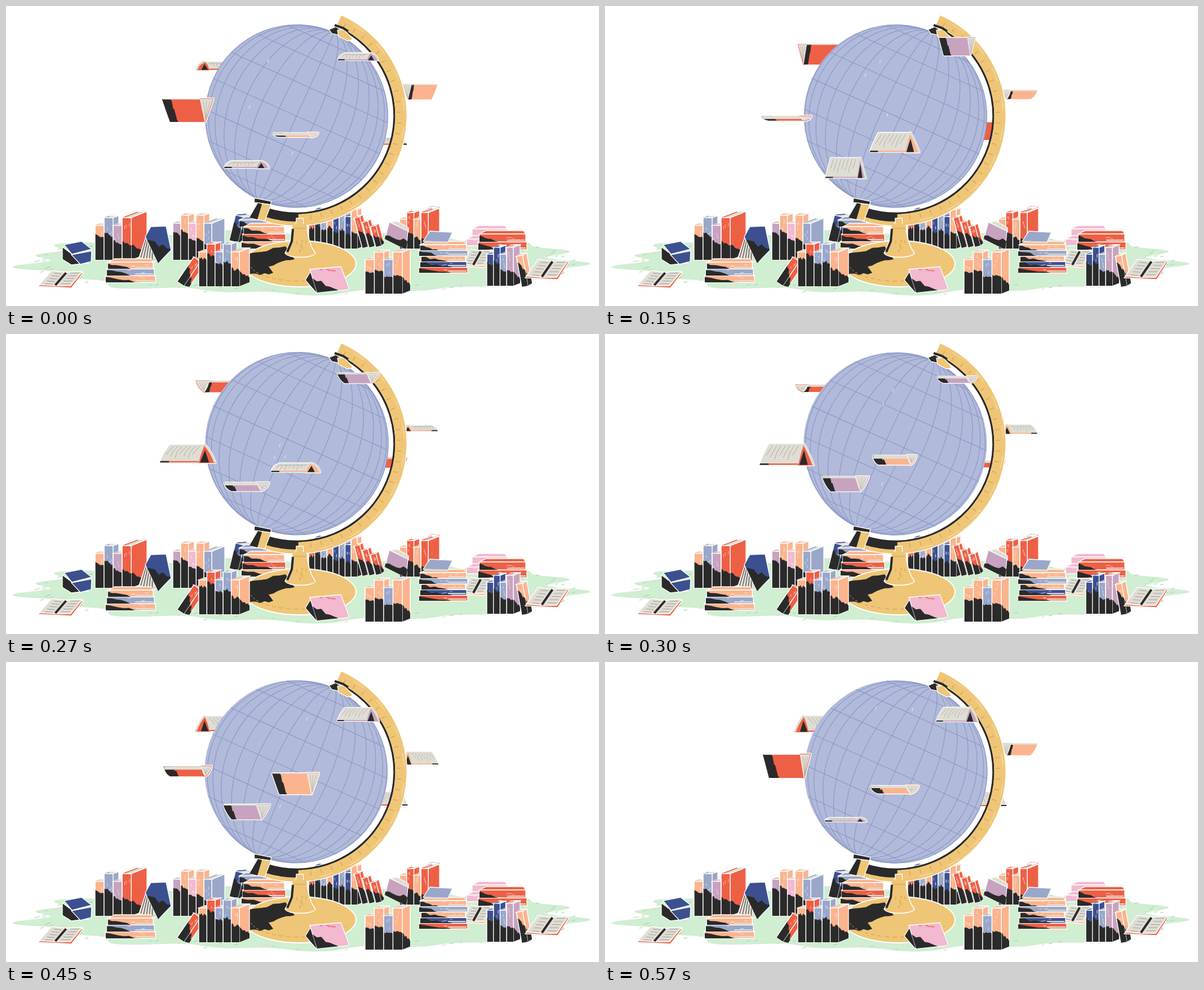
An HTML page with a canvas for the animation above (0.6 s loop, 1052x533 px).

```html
<!DOCTYPE html>
<html lang="en">
<head>
<meta charset="utf-8">
<title>Globe and flying books</title>
<style>
html, body { margin: 0; width: 100%; height: 100%; overflow: hidden; background: #fff; }
canvas { display: block; }
</style>
</head>
<body>
<canvas id="stage" width="1052" height="533"></canvas>
<script>
const ctx = document.getElementById('stage').getContext('2d');
const ink = '#2b2a2a', pages = '#dfddd4', peach = '#fbb48d', red = '#ee6045', lilac = '#c7a3bf',
  navy = '#3c508f', slate = '#9aa7c9', pink = '#f2b9d0', gold = '#efc677', ochre = '#d2a049',
  green = '#d0eed1', mint = '#a5cfb2', blush = '#f6c4cf', blue = '#b1bada', gridBlue = '#8e99c6';
const CX = 515.5, CY = 195, R = 162.5, STEP = 30, STEPS = 20, LOOP = STEP * STEPS;
const rad = deg => deg * Math.PI / 180;
const mix = (a, b, k) => a + (b - a) * k;

let seed = 1;
const rnd = () => (seed = seed * 16807 % 2147483647) / 2147483647;

function poly(color, p, edge = '#fff') {
  ctx.beginPath();
  for (let i = 0; i < p.length; i += 2) ctx.lineTo(p[i], p[i + 1]);
  ctx.closePath();
  ctx.fillStyle = color;
  ctx.fill();
  if (edge) { ctx.strokeStyle = edge; ctx.lineWidth = 1.3; ctx.stroke(); }
}

function line(color, width, ...p) {
  ctx.beginPath();
  for (let i = 0; i < p.length; i += 2) ctx.lineTo(p[i], p[i + 1]);
  ctx.strokeStyle = color;
  ctx.lineWidth = width;
  ctx.stroke();
}

function arc(r, from, to, color, width) {
  ctx.beginPath();
  ctx.arc(CX, CY, r, rad(from), rad(to));
  ctx.strokeStyle = color;
  ctx.lineWidth = width;
  ctx.stroke();
}

function ellipse(x, y, rx, ry, color) {
  ctx.beginPath();
  ctx.ellipse(x, y, rx, ry, 0, 0, 7);
  ctx.fillStyle = color;
  ctx.fill();
}

// Points of a rough brushed line, used as the border of shadows.
function ragged(x0, y0, x1, y1, amp = 3, n = 6) {
  const p = [];
  for (let i = 0; i <= n; i++)
    p.push(mix(x0, x1, i / n), mix(y0, y1, i / n) + (i % n ? (rnd() - .5) * 2 * amp : 0));
  return p;
}

function flecks(x, y, w, h, n, color, dx = 5, dy = 0) {
  for (let i = 0; i < n; i++) {
    const a = x + rnd() * w, b = y + rnd() * h;
    line(color, 1.1, a, b, a + dx, b + dy);
  }
}

// The shadow covers the lower part of the spine, from one share of its height to another.
function upright(x, bottom, w, h, color, depth, from, to) {
  const top = bottom - h, rise = depth * .4, r = x + w, back = r + depth, shade = bottom - h * to;
  poly(color, [r, top, back, top - rise, back, bottom - rise, r, bottom]);
  poly(ink, [...ragged(r, shade, back, mix(shade, bottom - rise, .6)), back, bottom - rise, r, bottom], null);
  poly(pages, [x, top, x + depth, top - rise, back, top - rise, r, top]);
  line(color, 1.6, x + 1, top, x + depth, top - rise + 1);
  poly(color, [x, top, r, top, r, bottom, x, bottom]);
  flecks(x + 3, top + 5, w - 6, h * .3, 3, '#fff8', 0, 5);
  poly(ink, [...ragged(x, bottom - h * from, r, shade), r, bottom, x, bottom], null);
  line('#fff', 1.3, x, top, x, bottom);
}

// Low and high books take turns; one long shadow falls across the row.
function row(x, bottom, width, height, colors, depth = 14, from = .75, to = .35) {
  const n = colors.length, w = width / n;
  colors.forEach((color, i) => upright(x + i * w, bottom, w, height * (i % 2 ? 1.1 : .9), color,
    i < n - 1 ? 10 : depth, mix(from, to, i / n), mix(from, to, (i + 1) / n)));
}

function lean(x, y, angle, ...book) {
  ctx.save();
  ctx.translate(x, y);
  ctx.rotate(rad(angle));
  upright(0, 0, ...book);
  ctx.restore();
}

function lying(x, y, w, h, color, dark) {
  poly(color, [x, y, x + 12, y - 6, x + w - 4, y - 6, x + w, y]);
  poly(color, [x, y, x + w, y, x + w, y + h, x, y + h]);
  line(pages, 2, x + w * .6, y + h - 3, x + w - 2, y + h - 3);
  flecks(x + w * .4, y + 2, w * .45, h - 5, 3, '#fff8');
  if (dark) poly(ink, [...ragged(x, y + h * .2, x + w * dark, y + h, 2), x, y + h], null);
}

// Colours run from the lowest book to the highest.
function stack(x, bottom, width, thick, colors, dark = .7) {
  colors.forEach((color, i) => lying(x + i % 3 * 2, bottom - (i + 1) * thick,
    width - i % 3 * 4, thick, color, dark - i * .1));
}

function spread(x, y, w, h, color) {
  const m = x + w / 2, fold = w * .12;
  poly(color, [x, y + h, x + w * .3, y + 2, x + w, y + 4, x + w * .74, y + h + 3]);
  poly(pages, [x + 2, y + h - 3, x + w * .3, y, m + fold, y + 3, m - fold, y + h - 1]);
  poly(pages, [m - fold, y + h - 1, m + fold, y + 3, x + w - 1, y + 1, x + w * .72, y + h - 1]);
  line(ink, 4, m - fold, y + h - 2, m + fold, y + 4);
  for (let i = 1; i < 6; i++) {
    const s = x + w * .3 * (1 - i / 6), b = y + h * i / 6;
    line('#8f8d87', .8, s + w * .1, b, s + w * .27, b + 1);
    line('#8f8d87', .8, s + w * .46, b, s + w * .66, b);
  }
}

function ground() {
  ctx.beginPath();
  for (let a = 0; a < 360; a += 2) {
    const t = rad(a), wob = 1 + .04 * Math.sin(9 * t) + .05 * Math.sin(17 * t + 1);
    ctx.lineTo(527 + 480 * wob * Math.cos(t), 455 + 55 * wob * Math.sin(t));
  }
  ctx.fillStyle = green;
  ctx.fill();
  for (let a = 0; a < 360; a += 4) {
    const x = 527 + 470 * Math.cos(rad(a)), y = 457 + 50 * Math.sin(rad(a));
    flecks(x - 15, y - 6, 30, 12, 1, a % 20 ? mint : blush, 6, -1.5);
  }
}

function backBooks() {
  // Left
  poly(ink, [100, 428, 116, 440, 152, 436, 151, 456, 116, 460, 100, 450]);
  poly(navy, [116, 442, 152, 435, 151, 454, 132, 459]);
  poly(navy, [103, 424, 134, 418, 152, 432, 117, 441]);
  row(158, 451, 64, 68, [peach, slate, lilac, red], 28);
  poly(pages, [250, 405, 236, 447, 258, 456, 274, 450]);
  for (let i = 0; i < 5; i++) line(ink, 1, 249 + i * 3, 412, 239 + i * 5, 447 + i * 2);
  poly(navy, [247, 410, 257, 392, 284, 391, 293, 434, 270, 457]);
  poly(ink, [...ragged(250, 415, 292, 432, 4), 270, 457], null);
  spread(57, 470, 80, 28, red);
  stack(177, 491, 88, 12, [peach, slate, peach]);
  row(296, 451, 69, 72, [lilac, peach, pink, peach, slate], 23);

  // Middle
  lean(396, 416, 14, 16, 46, navy, 18, .7, .5);
  lying(414, 380, 50, 12, slate, .5);
  stack(418, 431, 80, 13, [peach, red, peach], .8);
  row(537, 431, 86, 63, [red, navy, slate, peach, navy, slate, navy, peach], 8, .65, .4);
  for (let i = 0; i < 3; i++) lean(632 + i * 12, 430 - i, -15, 10, 55 - i * 9, red, 6, .6, .4);

  // Right
  row(735, 400, 26, 38, [pink, pink], 9, 0, 0);
  row(698, 431, 51, 58, [peach, red, peach, red], 20, .6, .2);
  poly(pages, [682, 384, 694, 382, 714, 394, 714, 402]);
  poly(lilac, [680, 384, 713, 400, 710, 433, 672, 414]);
  poly(ink, [...ragged(673, 408, 712, 418, 4), 710, 433, 672, 414], null);
  lying(827, 396, 62, 26, pink, 0);
  lying(817, 414, 30, 12, pink, 0);
  stack(838, 433, 86, 14, [red, red], .5);
  spread(808, 432, 55, 30, peach);
  stack(733, 474, 86, 10, [red, navy, peach, slate, peach], .8);
  poly(slate, [740, 418, 752, 400, 792, 402, 784, 420]);
  line(pages, 3, 742, 419, 783, 420);
  row(853, 497, 47, 62, [navy, navy, slate, lilac], 12);
  lean(915, 499, -10, 11, 55, peach, 8, .8, .5);
  spread(921, 450, 78, 33, red);
  row(637, 511, 66, 67, [peach, peach, slate, peach], 14, .65, .4);
}

function frontBooks() {
  lean(304, 489, 34, 14, 52, red, 9, .7, .4);
  row(342, 498, 72, 68, [peach, red, slate, slate, peach], 18, .85, .45);
  poly(ink, [531, 487, 540, 472, 558, 502, 550, 509]);
  poly(pink, [539, 468, 594, 463, 608, 500, 607, 504, 552, 509]);
  poly(ink, [...ragged(544, 484, 590, 505), 552, 509], null);
  flecks(552, 468, 30, 4, 5, red, 6);
}

function stand() {
  ellipse(521, 458, 101, 42, '#fff');
  ellipse(521, 458, 99, 40, gold);
  poly(ink, [...ragged(430, 440, 496, 427), ...ragged(512, 450, 466, 463), ...ragged(474, 474, 428, 478)], null);
  for (let a = 20; a < 165; a += 9) {
    const on = deg => [521 + 88 * Math.cos(rad(deg)), 458 + 31 * Math.sin(rad(deg))];
    line(ochre, 1, ...on(a), ...on(a + 5));
  }

  arc(185, -66.5, 108, '#fff', 23);
  arc(173.5, -62, 108, ink, 3.5);
  arc(185, -66, 108, gold, 20);
  arc(181, 89, 108, ink, 14);
  for (let a = -62; a < 86; a += 6) {
    const c = Math.cos(rad(a)), s = Math.sin(rad(a));
    line(ochre, 1.2, CX + 178 * c, CY + 178 * s, CX + 186 * c, CY + 186 * s);
  }
  for (let a = -58; a < 86; a += 16) arc(191, a, a + 7, '#f6dc9c', 1.3);

  poly(ink, [573, 42, 585, 37, 596, 44, 592, 52, 578, 49]);
  poly(gold, [588, 43, 600, 42, 616, 60, 606, 62, 590, 54]);
  line(ink, 4, 583, 34, 598, 39, 607, 45);
  poly(ink, [441, 341, 471, 347, 469, 353, 440, 349]);
  poly(gold, [447, 350, 470, 353, 459, 382, 434, 377]);
  poly(ink, [447, 350, 454, 352, 446, 379, 432, 376], null);

  poly(gold, [515, 377, 527, 377, 528, 392, 514, 392]);
  ctx.beginPath();
  ctx.moveTo(508, 390);
  ctx.quadraticCurveTo(506, 422, 495, 439);
  ctx.bezierCurveTo(500, 449, 544, 449, 549, 439);
  ctx.quadraticCurveTo(536, 422, 534, 390);
  ctx.fillStyle = gold;
  ctx.fill();
  ctx.strokeStyle = '#fff';
  ctx.lineWidth = 1.6;
  ctx.stroke();
  line(ink, 4, 509, 396, 507, 418, 499, 437);
  ellipse(521, 391, 13, 4, gold);
  line(ochre, 1, 509, 395, 533, 395);
  flecks(515, 404, 18, 30, 6, ochre, 0, 6);
}

function globe(step) {
  const wob = rad(step * 137);
  ctx.save();
  ctx.translate(CX + Math.sin(wob) * .7, CY + Math.cos(wob) * .6);
  ctx.rotate(rad(24.3));
  ellipse(0, 0, R, R, blue);
  ctx.strokeStyle = gridBlue;
  ctx.lineWidth = 1.2;
  for (let lon = -84 + 12 * step / STEPS; lon < 90; lon += 12) {
    ctx.beginPath();
    ctx.ellipse(0, 0, R * Math.abs(Math.sin(rad(lon))), R, 0, -Math.PI / 2, Math.PI / 2, lon < 0);
    ctx.stroke();
  }
  for (let lat = -60; lat <= 60; lat += 20) {
    const y = -R * Math.sin(rad(lat)), w = R * Math.cos(rad(lat));
    line(gridBlue, 1.2, -w, y, w, y);
  }
  ctx.restore();
  seed = 977 + step * 5081;
  flecks(430, 80, 150, 200, 3, '#e4e9f6', 2, -6);
}

// One wing beat: a slow downstroke, then a quick upstroke. Positive heights point down.
function pose(time) {
  const DOWN = .65, SWING = 42, beat = (time / LOOP + .05) % 1, rising = beat > DOWN;
  const p = rising ? ((beat - DOWN) / (1 - DOWN)) ** .8 : beat / DOWN;
  const swing = Math.cos(Math.PI * p) * (rising ? SWING : -SWING);
  const least = rising && swing < 0 ? 18 : 8;
  const h = Math.sign(swing) * Math.max(Math.abs(swing), least);
  const bend = 1 - Math.abs(h) / SWING;
  return {
    h, bend,
    spine: -12 * ((swing + SWING) / (2 * SWING)) ** 2,
    spread: 11 + 7 * Math.abs(Math.sin(2 * Math.PI * p)),
    edge: 1 + (rising ? 9 : 5) * bend
  };
}

function flyer(time, { x, y, size, color, lead, mirrored }) {
  const { h, bend, spine, spread, edge } = pose(time + lead * STEP);
  const length = 62, tip = spine + h, near = -spread * .6, far = -length - spread;
  const reach = .5 + .5 * bend, bow = spine + h * (.5 - .4 * bend);
  const wing = new Path2D(), mouth = new Path2D();
  wing.moveTo(far, tip);
  wing.lineTo(near, tip);
  wing.quadraticCurveTo(near * reach, bow, 0, spine);
  wing.lineTo(-length, spine);
  wing.quadraticCurveTo(-length - spread * reach, bow, far, tip);
  mouth.moveTo(near, tip);
  mouth.quadraticCurveTo(near * reach, bow, 0, spine);
  mouth.quadraticCurveTo(spread * reach, bow, spread, tip);
  mouth.closePath();

  ctx.save();
  ctx.translate(x, y);
  ctx.scale(mirrored ? -size : size, size);
  ctx.lineJoin = 'round';
  ctx.strokeStyle = '#fff';
  ctx.lineWidth = 5;
  ctx.stroke(mouth);
  ctx.lineWidth = 3;
  ctx.stroke(wing);
  ctx.lineWidth = 2;
  ctx.strokeStyle = color;
  ctx.stroke(mouth);
  const up = h < 0;
  ctx.fillStyle = up ? pages : color;
  ctx.fill(mouth);
  ctx.fillStyle = up ? color : pages;
  ctx.fill(wing);

  ctx.save();
  ctx.clip(wing);
  if (up) {
    // The shadow lies on the left end of the cover, whichever way the book points.
    const outer = mirrored ? 9 : far - 9, inner = mirrored ? -17 : far + 15;
    const lower = mirrored ? inner + 8 : inner + 14;
    seed = 4242;
    poly(ink, [...ragged(inner, tip, lower, spine), outer, spine, outer, tip], null);
  } else {
    for (let i = 0; i < 7; i++) {
      const u = -length + 6 + i * length / 8;
      line('#aaa89f', 1, u, spine + 3, u - spread * .5, bow, u - spread * .7, spine + h * (.55 + i % 3 * .1));
    }
    line(color, 5, far, tip, near, tip);
    line(ink, 5, far, tip, far + 16, tip);
  }
  ctx.restore();

  if (up) {
    line(pages, edge, far + 1, tip + edge / 2, spread, tip + edge / 2);
    line('#fff', 1, near, tip, 0, spine);
    if (h < -12) for (let i = 1; i < 4; i++) line('#aaa89f', .7, 1, spine - 5, near + i * spread * .4, tip + 4);
  } else {
    poly(ink, [0, spine + h * .3, near * .8, tip, spread * .4, tip], null);
    ctx.beginPath();
    ctx.moveTo(0, spine);
    ctx.quadraticCurveTo(spread * reach, bow, spread, tip);
    ctx.strokeStyle = pages;
    ctx.lineWidth = 4;
    ctx.stroke();
  }
  ctx.restore();
}

// Each book hangs from the end of its spine and leads the beat by some steps.
const behind = [
  { x: 352, y: 104, size: .85, color: red, lead: 14, mirrored: true },
  { x: 713, y: 166, size: .68, color: peach, lead: 18, mirrored: true },
  { x: 652, y: 238, size: .76, color: red, lead: 14, mirrored: true }];
const inFront = [
  { x: 353, y: 206, size: 1, color: red, lead: 0 },
  { x: 542, y: 235, size: .92, color: peach, lead: 5 },
  { x: 453, y: 280, size: .85, color: lilac, lead: 7 },
  { x: 648, y: 88, size: .76, color: lilac, lead: 14 }];

function layer(...parts) {
  const canvas = document.createElement('canvas');
  canvas.width = ctx.canvas.width;
  canvas.height = ctx.canvas.height;
  parts.forEach(part => part());
  canvas.getContext('2d').drawImage(ctx.canvas, 0, 0);
  ctx.clearRect(0, 0, canvas.width, canvas.height);
  return canvas;
}
const back = layer(ground, backBooks), front = layer(stand, frontBooks);

let shown = -1;
function frame() {
  const step = Math.floor(performance.now() / STEP) % STEPS;
  if (step !== shown) {
    shown = step;
    ctx.clearRect(0, 0, ctx.canvas.width, ctx.canvas.height);
    ctx.drawImage(back, 0, 0);
    behind.forEach(book => flyer(step * STEP, book));
    globe(step);
    ctx.drawImage(front, 0, 0);
    inFront.forEach(book => flyer(step * STEP, book));
  }
  requestAnimationFrame(frame);
}
frame();
</script>
</body>
</html>
```
